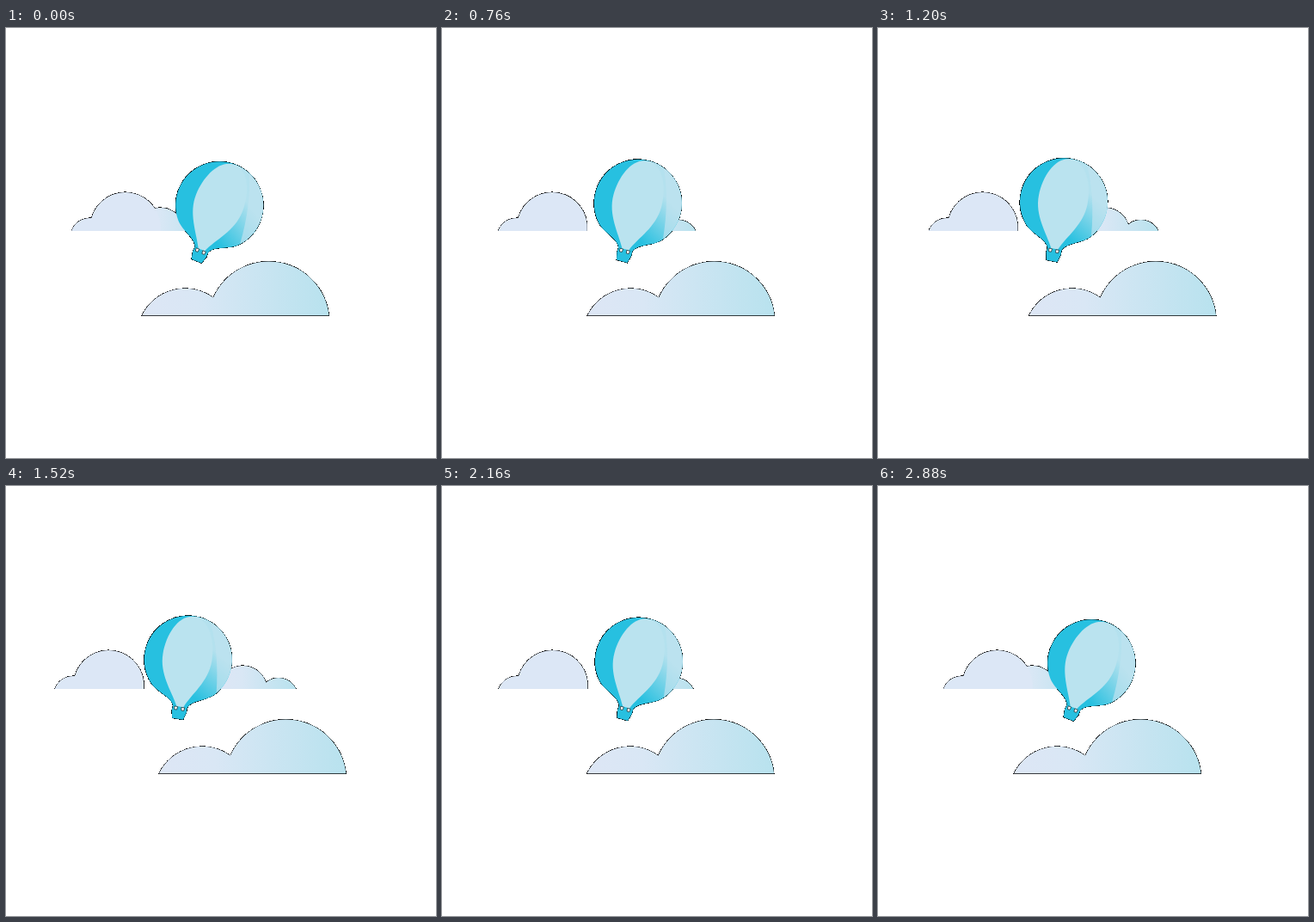
Write an HTML page that moves like this. It is 500 px wide and 500 px high and loops after 2960 ms.

```html
<!DOCTYPE html>
<html lang="en">
<head>
<meta charset="utf-8">
<title>Balloon over clouds</title>
<style>
  html, body { margin: 0; width: 100%; height: 100%; overflow: hidden; background: #fff; }
  svg { display: block; width: 100vw; height: 100vh; }
  .edges { fill: none; stroke: #000; stroke-width: 1; shape-rendering: crispEdges; }
</style>
</head>
<body>
<svg viewBox="0 0 500 500">
  <defs>
    <linearGradient id="sky">
      <stop offset="0" stop-color="#dde6f5"/>
      <stop offset=".3" stop-color="#d9e7f5"/>
      <stop offset="1" stop-color="#b8e2ee"/>
    </linearGradient>
    <linearGradient id="shade" gradientUnits="userSpaceOnUse" x1="14" y1="42" x2="42" y2="-8">
      <stop offset="0" stop-color="#27c0e0"/>
      <stop offset="1" stop-color="#b4e1ee"/>
    </linearGradient>
    <path id="back" d="M151 236A28.5 28.5 0 0 1 206.5 228.4A22.6 22.6 0 0 1 241.5 236"/>
    <path id="left" d="M76 236A23.1 23.1 0 0 1 99.3 221A41 41 0 0 1 179.6 236"/>
    <path id="low" d="M158 334.2A55.8 55.8 0 0 1 241 313.5A70.5 70.5 0 0 1 375.6 334.2Z"/>
    <g id="hull">
      <path d="M-8 57C-10 46 -29 44 -38 34A51 51 0 1 1 38 34C29 44 10 46 8 57Z"/>
      <path d="M-8.3 56H8.3L8.5 61L6 70H-6.8L-8.8 61Z"/>
    </g>
  </defs>

  <!-- Dark rim first: the soft-edged fills above leave it only around the joint outline -->
  <g class="edges">
    <use href="#back" data-part="back"/>
    <use href="#left" data-part="left"/>
    <use href="#low" data-part="low"/>
    <use href="#hull" data-part="balloon"/>
  </g>

  <use href="#back" data-part="back" fill="url(#sky)"/>
  <use href="#left" data-part="left" fill="#dce7f6"/>
  <use href="#low" data-part="low" fill="url(#sky)"/>
  <g data-part="balloon">
    <use href="#hull" fill="#27c0e0"/>
    <path d="M0 -51A51 51 0 0 1 38 34C29 44 10 46 8 57H0Z" fill="url(#shade)"/>
    <path d="M18 -47.7Q34 -15 39 32.8A51 51 0 0 0 18 -47.7Z" fill="#bfe3f0" opacity=".7"/>
    <path d="M-1 -50.5C17 -50.5 27.5 -26 27.5 -3C27.5 22 11 38 4 55.5H-4C-13 39 -30 22 -30 -2C-30 -26 -19 -50.5 -1 -50.5Z" fill="#bae3ef"/>
    <g fill="#fff" stroke="#111" stroke-width=".6">
      <path d="M-6.5 56H-2.7L-3.2 59.6H-6Z"/>
      <path d="M1.7 56H5.5L5 59.6H2.2Z"/>
    </g>
  </g>
</svg>
<script>
  const STEP = 40, LOOP = 2960, TURN = 36;

  // Each part as a transform for progress p: 0 at the start, 1 at the turn
  const motion = {
    back: p => `translate(${101.5 * p} 0)`,
    left: p => `translate(${-20.5 * p} 0)`,
    low: p => `translate(${21 * p} 0)`,
    balloon: p => `translate(${248.2 - 38.6 * p} ${206.3 - 4.7 * p}) rotate(${22 - 13 * p})`
  };
  const parts = [...document.querySelectorAll('[data-part]')];
  const start = performance.now();

  function draw() {
    const time = (performance.now() - start) % LOOP;
    const step = Math.min(Math.floor(time / STEP), 2 * TURN);
    const p = 1 - Math.abs(step - TURN) / TURN;
    for (const el of parts) el.setAttribute('transform', motion[el.dataset.part](p));
    requestAnimationFrame(draw);
  }
  draw();
</script>
</body>
</html>
```
